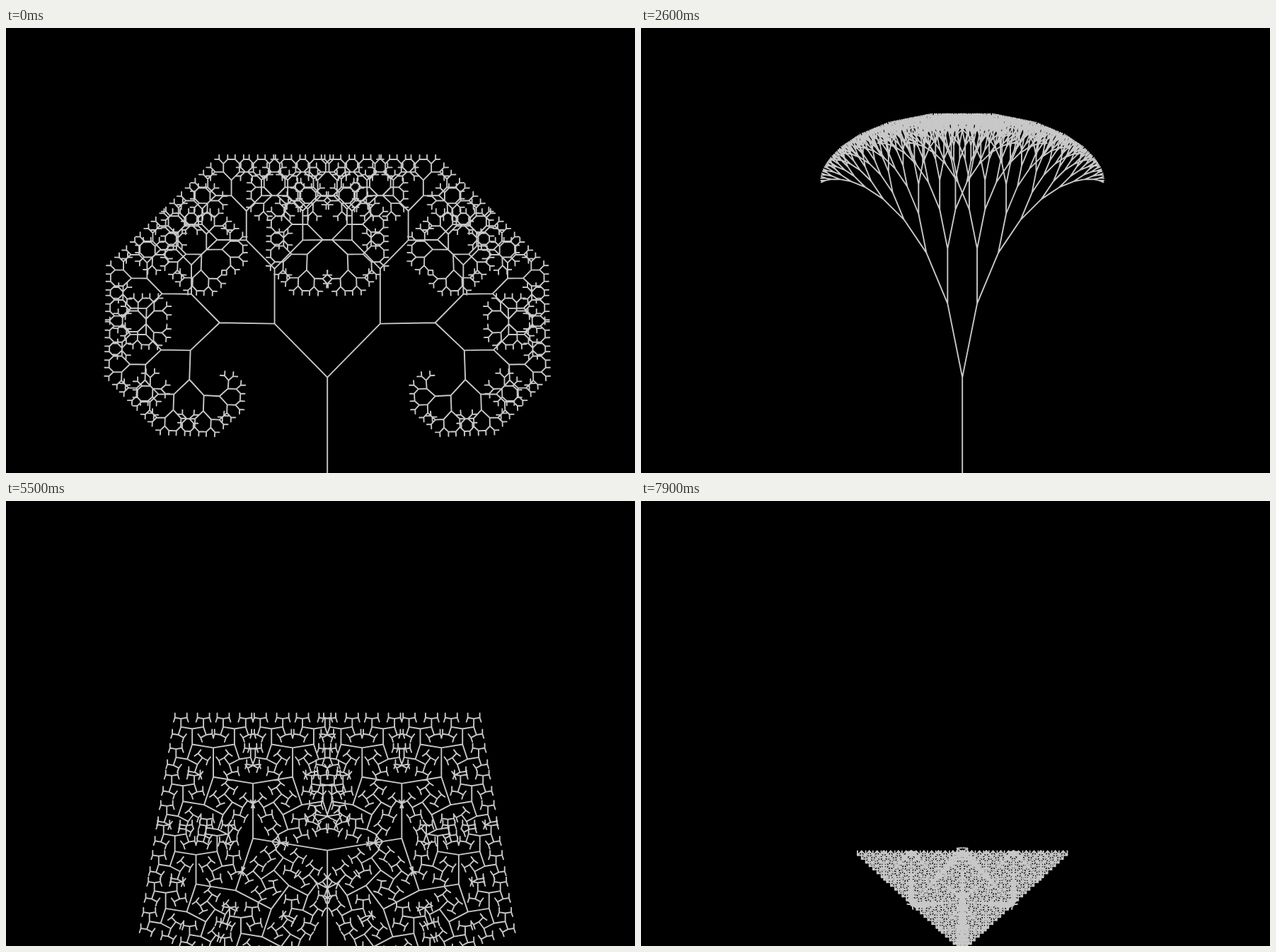
An HTML page with a canvas that plays this animation: 889 px wide and 630 px high, repeating every 8000 ms.

```html
<!DOCTYPE html>
<html lang="en">
<head>
<meta charset="utf-8">
<title>Fractal tree</title>
<style>
  html, body { margin: 0; width: 100%; height: 100%; overflow: hidden; background: #000; }
  canvas { display: block; }
</style>
</head>
<body>
<canvas id="stage" width="889" height="630"></canvas>
<script>
const ctx = document.getElementById('stage').getContext('2d');
const LOOP = 8000, STEP = 100, HOLD_STEPS = 2;
const ROOT = { x: 454.2, y: 494.6 };
const FIRST_BRANCH = 106.5, RATIO = 0.73, LEVELS = 10;

// The spread starts slowly, then closes and turns inside out at a nearly steady pace.
const START_SPREAD = 44.5, SLOW_STEPS = 9, SLOW_RATE = 2.14, RATE = 2.45, SLOWDOWN = 0.0009;

function spreadAt(step) {
  const slow = Math.min(step, SLOW_STEPS);
  const rest = step - slow;
  const degrees = START_SPREAD - SLOW_RATE * slow - RATE * rest + SLOWDOWN * rest * rest;
  return degrees * Math.PI / 180;
}

function branch(x, y, heading, length, spread, level) {
  if (level === 0) return;
  for (const side of [-1, 1]) {
    const dir = heading + side * spread;
    const endX = x + length * Math.sin(dir);
    const endY = y - length * Math.cos(dir);
    ctx.moveTo(x, y);
    ctx.lineTo(endX, endY);
    branch(endX, endY, dir, length * RATIO, spread, level - 1);
  }
}

function draw(step) {
  ctx.fillStyle = '#000';
  ctx.fillRect(0, 0, 889, 630);
  ctx.strokeStyle = '#c8c8c8';
  ctx.lineWidth = 1.9;
  ctx.lineCap = 'round';
  ctx.beginPath();
  ctx.moveTo(ROOT.x, 640);
  ctx.lineTo(ROOT.x, ROOT.y);
  branch(ROOT.x, ROOT.y, 0, FIRST_BRANCH, spreadAt(step), LEVELS);
  ctx.stroke();
}

let shown = -1;
function tick() {
  const time = performance.now() % LOOP;
  const step = Math.max(0, Math.floor(time / STEP) - HOLD_STEPS);
  if (step !== shown) draw(shown = step);
  requestAnimationFrame(tick);
}
tick();
</script>
</body>
</html>
```
